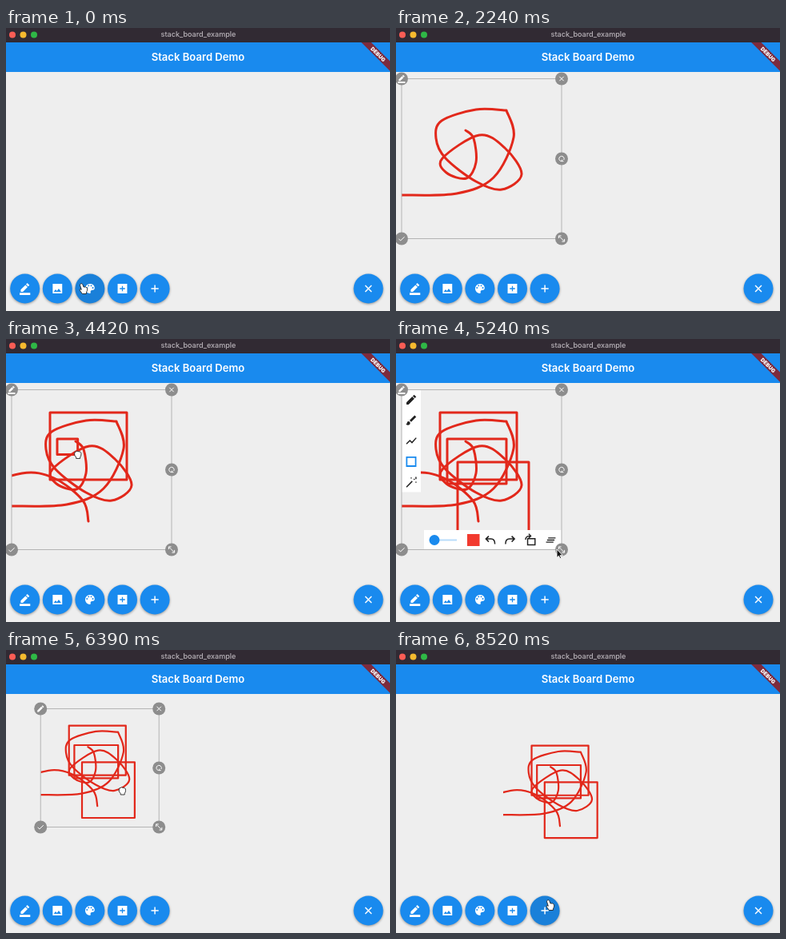
These frames come from a looping animation (480x354 px, 8.56 s). An HTML page:

```html
<!DOCTYPE html>
<html lang="en">
<head>
<meta charset="utf-8">
<title>stack_board_example</title>
<style>
html, body { margin: 0; width: 100%; height: 100%; overflow: hidden; background: #eee; }
svg { display: block; width: 480px; height: 354px; }
text { font-family: Inter, Roboto, sans-serif; text-anchor: middle; }
.fab > circle { filter: drop-shadow(0 1.8px 1.8px rgba(0,0,0,.38)); }
.ink { fill: none; stroke: #e2281b; stroke-width: 3; stroke-linejoin: round; stroke-linecap: round; }
.solid { fill: currentColor; fill-rule: evenodd; }
.line { fill: none; stroke: currentColor; stroke-width: 2.2; }
</style>
</head>
<body>
<svg id="stage" viewBox="0 0 480 354"></svg>
<script>
const LOOP = 8560, LEFT = 7, TOP = 63.5, SIDE = 200, SMALL = 148, FAB_Y = 326;
const BLUE = '#198aee', DARK = '#222';

// Icons on a 24 unit grid
const dot = (x, y) => `M${x - 1.5} ${y}a1.5 1.5 0 1 0 3 0a1.5 1.5 0 1 0-3 0`;
const SOLID = {
  edit: 'M3 21v-4L14 6l4 4L7 21zM15 5l2.500-2.500 4 4L19 9z',
  border: 'M2 20h20v4H2zM4 18v-4l9-9 4 4-9 9zM14 4l2.500-2.500 4 4L18 8z',
  image: 'M3 3h18v18H3zM5 18h14l-4.500-6-3.500 4.500-2.500-3z',
  palette: 'M12 3a9 9 0 1 0 0 18q2.500-.5 1-3.500 0-2.500 3-2.500 5 0 5-4.500Q20 3 12 3z'
    + dot(6.5, 10.5) + dot(9.5, 6.5) + dot(14.5, 6.5) + dot(17.5, 10.5),
  addBox: 'M3 3h18v18H3zM7 11v2h4v4h2v-4h4v-2h-4V7h-2v4z',
  brush: 'M7 14q-3 0-3 3 0 2-2 2 1.500 2 4 2 4 0 4-4 0-3-3-3zM9 12l9.500-9.500 3 3L12 15z'
};
const LINE = {
  add: 'M5 12h14M12 5v14',
  close: 'M6 6l12 12M18 6L6 18',
  check: 'M4 12.500l5 5L20 7',
  chart: 'M3 17.500l6.500-6.500 4 4L21.500 6',
  square: 'M5 5h14v14H5z',
  wand: 'M3 21L14 10M17 7l1.500-1.500M21 2v4M12 3v2M21 11v2',
  undo: 'M9 5L4 10l5 5M4 10h9q7 0 7 9',
  copy: 'M6 10h14v12H6zM2 12q0-7 9-7M8 1l4 4-4 4',
  clear: 'M7 8h14M5 12h14M3 16h14',
  turn: 'M13 18.900a7 7 0 1 1 5-3.500M13 14.500V19h4.500',
  resize: 'M5 5l14 14M4 11V4h7M20 13v7h-7'
};
const icon = (name, x, y, k = .66, color = '#fff', id = '', flip = 1) =>
  `<path id="${id}" class="${SOLID[name] ? 'solid' : 'line'}" color="${color}" d="${SOLID[name] || LINE[name]}"
    transform="translate(${x} ${y}) scale(${k * flip} ${k}) translate(-12 -12)"/>`;

// Smooth curve through key points
function curve(...p) {
  const at = i => p[Math.max(0, Math.min(p.length - 1, i))];
  const bend = (i, s) => [0, 1].map(j => at(i)[j] + s * (at(i + 1)[j] - at(i - 1)[j]) / 6);
  return 'M' + p[0] + p.slice(1).map((q, i) => `C${bend(i, 1)} ${bend(i + 1, -1)} ${q}`).join('');
}
const loops = curve([87, 128], [97, 138], [100, 168], [88, 188], [63, 181], [58, 163], [104, 134], [136, 150],
  [157, 183], [132, 202], [100, 192], [62, 163], [50, 138], [57, 116], [100, 102], [138, 103]);
const exit = curve([138, 103], [147, 137], [122, 187], [76, 207], [7, 209]);
const tail = curve([7, 209], [-36, 190], [20, 168], [60, 174], [96, 202], [103, 228]);

const boxes = [[55, 92, 96, 84], [64, 125, 74, 56], [77, 154, 89, 94]]
  .map(([x, y, w, h], i) => ({ x, y, w, h, from: 3830 + i * 480, to: 4110 + i * 480 }));

// The pointer rests at a place between two times and glides between rests
const rests = [];
const rest = (from, to, x, y) => rests.push([from, x, y], [to, x, y]);
const shrink = SIDE - SMALL, drag = [127, 35];
rest(0, 300, 97, FAB_Y);
rest(650, 760, 8, 66);
rest(980, 2750, 87, 130);
rest(2750, 2900, 103, 230);
rest(3340, 3550, 21, 156);
rest(3670, 3670, 54, 133);
for (const b of boxes) {
  rest(b.from - 30, b.from, b.x, b.y);
  rest(b.to, b.to, b.x + b.w, b.y + b.h);
}
rest(5225, 5420, 203, 268);
rest(5750, 5750, 203 - shrink, 268 - shrink);
rest(5940, 5960, 8, 66);
rest(6120, 6120, 127, 180);
rest(6210, 6250, 109, 166);
rest(6650, 6700, 109 + drag[0], 166 + drag[1]);
rest(7130, 7760, 143, 249);
rest(8210, LOOP, 193, 319);

const clamp = v => Math.max(0, Math.min(1, v));
const part = (t, a, b) => clamp((t - a) / (b - a));
const ease = (t, a, b) => { const v = part(t, a, b); return v * v * (3 - 2 * v); };
const within = (t, a, b) => t >= a && t < b;

function pointerAt(t) {
  const i = rests.findIndex(r => r[0] > t), a = rests[i - 1], b = rests[i], k = ease(t, a[0], b[0]);
  return [1, 2].map(j => a[j] + (b[j] - a[j]) * k);
}

const fabs = [...['border', 'image', 'palette', 'addBox', 'add'].map((n, i) => [n, 23.7 + i * 40.6]), ['close', 453]];
const handles = [['border', 0, 0], ['close', 1, 0], ['turn', 1, .5], ['check', 0, 1], ['resize', 1, 1]];
const penTools = ['edit', 'brush', 'chart', 'square', 'wand'];

stage.innerHTML = `
<clipPath id="clip"><rect x="${LEFT}" y="${TOP}" width="${SIDE}" height="${SIDE}"/></clipPath>
<rect width="480" height="354" fill="#eee"/>
<rect y="18" width="480" height="37" fill="${BLUE}"/>
<text x="240" y="40.9" font-size="13.1" font-weight="600" fill="#fff">Stack Board Demo</text>
<g transform="translate(480 18) rotate(45)">
  <rect x="-30" y="16.7" width="60" height="8.6" fill="#7d2b3d"/>
  <text y="23.4" font-size="6.6" font-weight="900" fill="#fff">DEBUG</text>
</g>
<rect width="480" height="18" fill="#312a33"/>
${['#fb5d55', '#f5b92f', '#2fb846'].map((c, i) => `<circle cx="${8 + i * 13.5}" cy="8.5" r="4" fill="${c}"/>`).join('')}
<text x="240.5" y="11.3" font-size="9.05" font-weight="500" fill="#b9b4ba">stack_board_example</text>
${fabs.map(([n, x]) => `<g class="fab"><circle cx="${x}" cy="${FAB_Y}" r="18.5"/>${icon(n, x, FAB_Y)}</g>`).join('')}
<g id="item">
  <g id="content">
    <g clip-path="url(#clip)">
      <path id="spiral" class="ink" d="${loops + exit.replace('M', 'L')}"/>
      <path id="tail" class="ink" d="${tail}"/>
      ${boxes.map(() => '<rect class="ink box"/>').join('')}
    </g>
    <g id="tools">
      <path d="M7 63.500h24v128H7zM35 239h171.500v24.500H35z" fill="#fff"/>
      ${penTools.map((n, i) => icon(n, 19, 76 + i * 25.8, n === 'square' ? .8 : .66, DARK, n + 'Tool')).join('')}
      <path d="M48 251.500H76" stroke="#b9dcfa" stroke-width="2"/>
      <circle cx="48" cy="251.500" r="6.500" fill="${BLUE}"/>
      <rect x="89" y="244" width="15.500" height="15" fill="#f23a2f"/>
      ${icon('undo', 118, 251.5, .7, DARK)}
      ${icon('undo', 142.5, 251.5, .7, DARK, '', -1)}
      ${icon('copy', 168.5, 251, .66, DARK)}
      ${icon('clear', 193.5, 251.5, .66, DARK)}
    </g>
  </g>
  <g id="chrome">
    <rect id="outline" fill="none" stroke="#b4b4b4"/>
    ${handles.map(([n], i) => `<g class="handle"><circle r="8" fill="#8d8d8d"/>${icon(n, 0, 0, .45, '#fff', 'mark' + i)}</g>`).join('')}
  </g>
</g>
<g id="cursor" fill="#fff" stroke="${DARK}" stroke-width=".9" stroke-linejoin="round">
  <path id="hand" d="M-3.500-6q1.500-1 2.300.7L0-2q3-1 4.800 1.800 0 3-1.400 5v1.700h-5L-4.500 2.500q-1-1.700.3-2l1.500.8-1.800-5.500q-.1-1.300 1-1.800z"/>
  <path id="fist" d="M-4-1q0-3 2-2.500Q-.7-5 .5-3.700 4.500-4 4.300-.5 4.300 2 3 3.500V5h-5V3.500Q-4.500 1.500-4-1z"/>
  <path id="arrow" d="M-2-5v10.500l2.400-2.200 1.600 3.400 1.600-.7-1.500-3.300h3.200z" fill="#111" stroke="#fff"/>
</g>`;

const $ = id => document.getElementById(id);
const all = q => [...document.querySelectorAll(q)];
const show = (el, on) => el.style.display = on ? '' : 'none';
const set = (el, o) => { for (const k in o) el.setAttribute(k, o[k]); };

const strokes = [[$('spiral'), 1000, 2200], [$('tail'), 2200, 2750]]
  .map(([el, from, to]) => ({ el, from, to, len: el.getTotalLength() }));
const boxEls = all('.box'), grips = all('.handle'), buttons = all('.fab > circle');

function draw(t) {
  let [cx, cy] = pointerAt(t);
  const editing = within(t, 760, 5950);
  const drawing = [...strokes, ...boxes].some(s => within(t, s.from, s.to));
  const moved = ease(t, 6250, 6650);
  const x = LEFT + drag[0] * moved, y = TOP + drag[1] * moved;
  const side = SIDE - shrink * ease(t, 5420, 5750);

  for (const { el, from, to, len } of strokes) {
    const done = len * part(t, from, to);
    show(el, t > from);
    el.style.strokeDasharray = t < to ? `${done} ${len + 9}` : 'none';
    if (within(t, from, to)) {
      const p = el.getPointAtLength(done);
      [cx, cy] = [p.x, p.y + 2];
    }
  }
  boxes.forEach((b, i) => {
    const k = ease(t, b.from, b.to);
    show(boxEls[i], t > b.from);
    set(boxEls[i], { x: b.x, y: b.y, width: b.w * k, height: b.h * k });
  });

  show($('item'), t >= 330);
  show($('chrome'), t < 7520);
  show($('tools'), editing && !drawing);
  set($('editTool'), { color: t < 3550 ? BLUE : DARK });
  set($('squareTool'), { color: t < 3550 ? DARK : BLUE });
  set($('mark0'), { d: SOLID[editing ? 'border' : 'edit'] });

  set($('content'), { transform: `translate(${x} ${y}) scale(${side / SIDE}) translate(${-LEFT} ${-TOP})` });
  set($('outline'), { x, y, width: side, height: side });
  handles.forEach(([, u, v], i) => set(grips[i], { transform: `translate(${x + u * side} ${y + v * side})` }));
  fabs.forEach(([, bx], i) =>
    set(buttons[i], { fill: Math.hypot(cx - bx, cy - FAB_Y) < 18.5 ? '#1a80d9' : BLUE }));

  const arrow = within(t, 5130, 5760), hand = !arrow && cy > 290;
  show($('arrow'), arrow);
  show($('hand'), hand);
  show($('fist'), !arrow && !hand);
  set($('cursor'), { transform: `translate(${cx} ${cy})` });
}

const start = performance.now();
function tick() {
  draw((performance.now() - start) % LOOP);
  requestAnimationFrame(tick);
}
tick();
</script>
</body>
</html>
```
